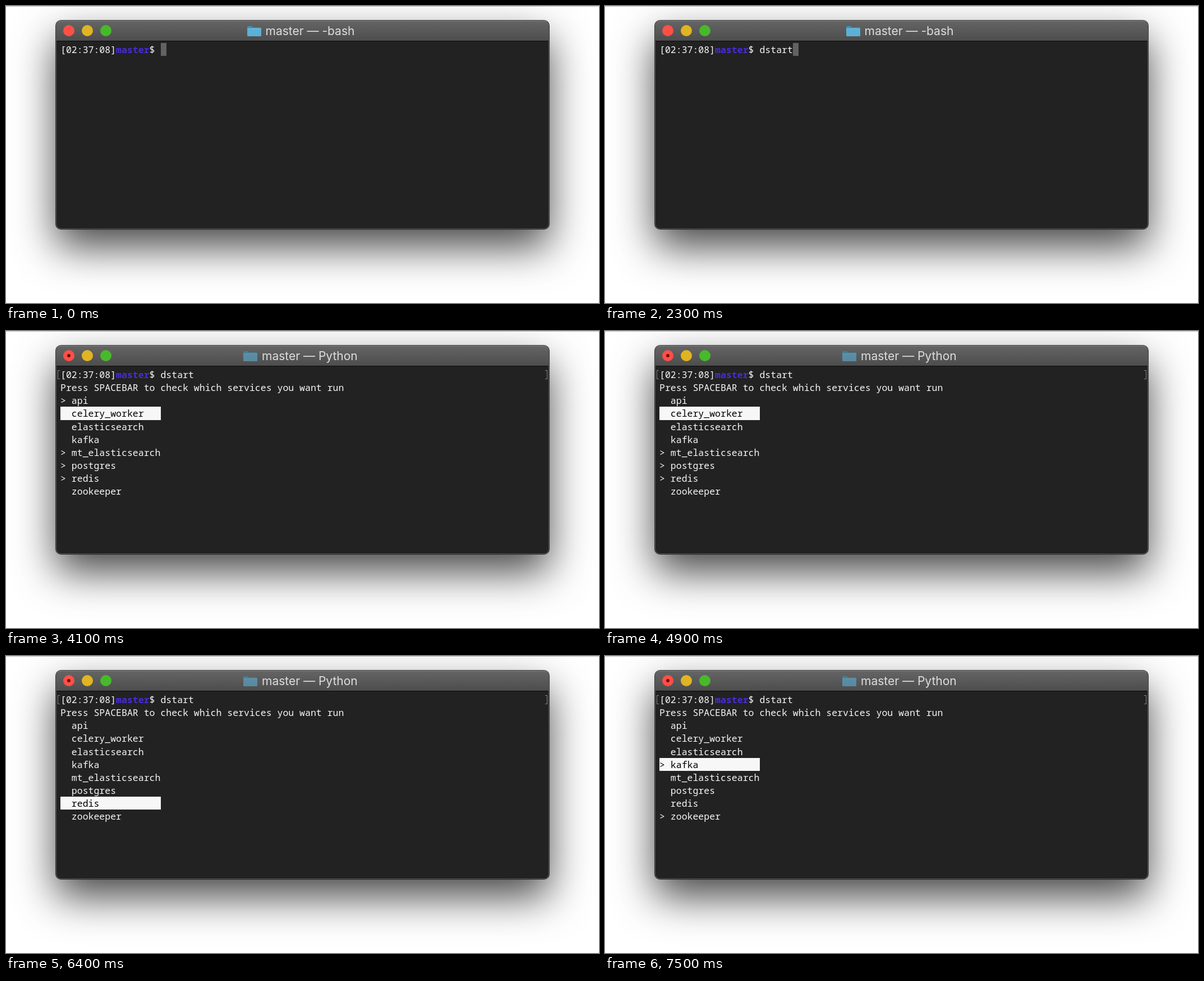
An HTML page that plays this animation: 1057 px wide and 530 px high, repeating every 8000 ms.

```html
<!DOCTYPE html>
<html lang="en">
<head>
<meta charset="utf-8">
<title>Terminal</title>
<style>
  html, body { margin: 0; width: 100%; height: 100%; overflow: hidden; background: #fff; }
  #stage { position: relative; width: 1057px; height: 530px; overflow: hidden; }
  #stage div { position: absolute; box-sizing: border-box; }
  #edge { left: 0; top: 0; width: 1057px; height: 1px; background: #b8b8b8; }
  #window {
    left: 89px; top: 26px; width: 879px; height: 372px; border-radius: 9px; background: #222;
    box-shadow: 0 0 0 1px rgba(0,0,0,.75), 0 32px 72px rgba(0,0,0,.72);
  }
  #bar {
    left: 0; top: 0; width: 879px; height: 37px; border-radius: 9px 9px 0 0;
    background: linear-gradient(#656565, #4d4d4d); border-bottom: 1px solid #0c0c0c;
  }
  #rim { inset: 0; border-radius: 9px; border: 1px solid #5c5c5c; border-top-color: #858585; }
  .light { top: 34px; width: 20px; height: 20px; border-radius: 50%; }
  #busy { left: 7px; top: 7px; width: 6px; height: 6px; border-radius: 50%; background: #720c08; }
  #folder { top: 36px; width: 25px; height: 18px; }
  #folder svg { display: block; }
  #title {
    top: 27px; height: 36px; white-space: pre; color: #dedede;
    font: 21px/36px Inter, "Liberation Sans", sans-serif;
  }
  .row {
    left: 97px; height: 23.13px; white-space: pre; color: #f7f7f7;
    font: 500 16.53px/23.13px "Noto Sans Mono", "DejaVu Sans Mono", monospace;
  }
  .row.on { width: 179px; background: #f7f7f7; color: #000; }
  .row b { color: #4a2bdc; }
  #cursor { width: 10px; height: 23px; background: #626262; }
  .mark { top: 70px; width: 4px; height: 16px; border: 1px solid #858585; }
</style>
</head>
<body>
<div id="stage">
  <div id="edge"></div>
  <div id="window"><div id="bar"></div><div id="rim"></div></div>
  <div class="light" style="left:102px;background:#ff5047"><div id="busy"></div></div>
  <div class="light" style="left:135px;background:#e0b422"></div>
  <div class="light" style="left:168px;background:#47b92b"></div>
  <div id="folder">
    <svg width="25" height="18">
      <path d="M0 2Q0 0 2 0H8L10 2H23Q25 2 25 4V8H0Z" fill="#3d93bd"/>
      <rect y="4" width="25" height="14" rx="1.5" fill="#5bb0d6"/>
      <path d="M0 4.5H25" stroke="#7cc6e4"/>
    </svg>
  </div>
  <div id="title"></div>
  <div id="cursor"></div>
  <div class="mark" style="left:92px;border-right:0"></div>
  <div class="mark" style="left:961px;border-left:0"></div>
</div>
<script>
const LOOP = 8000, CELL = 9.92, LINE = 23.13, LEFT = 97, TOP = 66;
const ENTER = 2900, MENU = 3000;
const typed = [1700, 1900, 2000, 2100, 2200, 2300];
const services = ['api', 'celery_worker', 'elasticsearch', 'kafka',
  'mt_elasticsearch', 'postgres', 'redis', 'zookeeper'];
const needs = { 0: [4, 5, 6], 3: [7] };
// Key presses: a number moves the selection, 0 is the space bar.
const keys = [[3700, 0], [4100, 1], [4300, -1], [4400, 0], [4500, 2], [4900, -1],
  [5200, 1], [5300, 1], [5500, 1], [5800, 0], [6000, 1], [6100, 0], [6200, 1],
  [6400, 0], [6700, -1], [6800, -1], [7000, -1], [7200, 0]];

const $ = id => document.getElementById(id);
const marks = document.querySelectorAll('.mark');

function addRow(i) {
  const row = document.createElement('div');
  row.className = 'row';
  row.style.top = TOP + LINE * i + 'px';
  return $('stage').appendChild(row);
}
const prompt = addRow(0), hint = addRow(1);
const items = services.map((_, i) => addRow(i + 2));
prompt.innerHTML = '[02:37:08]<b>master</b>$ <span></span>';
const command = prompt.lastChild;

function menuState(t) {
  let selected = 0;
  const checked = new Set();
  for (const [time, move] of keys) {
    if (time > t) break;
    selected += move;
    if (move) continue;
    if (!checked.delete(selected))
      [selected, ...(needs[selected] || [])].forEach(i => checked.add(i));
  }
  return { selected, checked };
}

function draw(t) {
  const entered = t >= ENTER, menu = t >= MENU;
  const count = typed.filter(time => time <= t).length;
  command.textContent = 'dstart'.slice(0, count);

  $('title').textContent = menu ? 'master — Python' : 'master — -bash';
  $('title').style.left = (menu ? 456 : 462.5) + 'px';
  $('folder').style.left = (menu ? 423 : 430) + 'px';
  $('folder').style.opacity = menu ? .6 : 1;
  $('busy').hidden = !menu;
  marks.forEach(mark => mark.hidden = !entered);

  $('cursor').hidden = menu;
  $('cursor').style.left = LEFT + (entered ? 0 : Math.round(CELL * (18 + count))) + 'px';
  $('cursor').style.top = TOP + (entered ? 23 : 0) + 'px';

  hint.textContent = menu ? 'Press SPACEBAR to check which services you want run' : '';
  const { selected, checked } = menuState(t);
  items.forEach((row, i) => {
    row.textContent = menu ? (checked.has(i) ? '> ' : '  ') + services[i] : '';
    row.classList.toggle('on', menu && i === selected);
  });
}

const start = performance.now();
function tick() {
  draw((performance.now() - start) % LOOP);
  requestAnimationFrame(tick);
}
tick();
</script>
</body>
</html>
```
